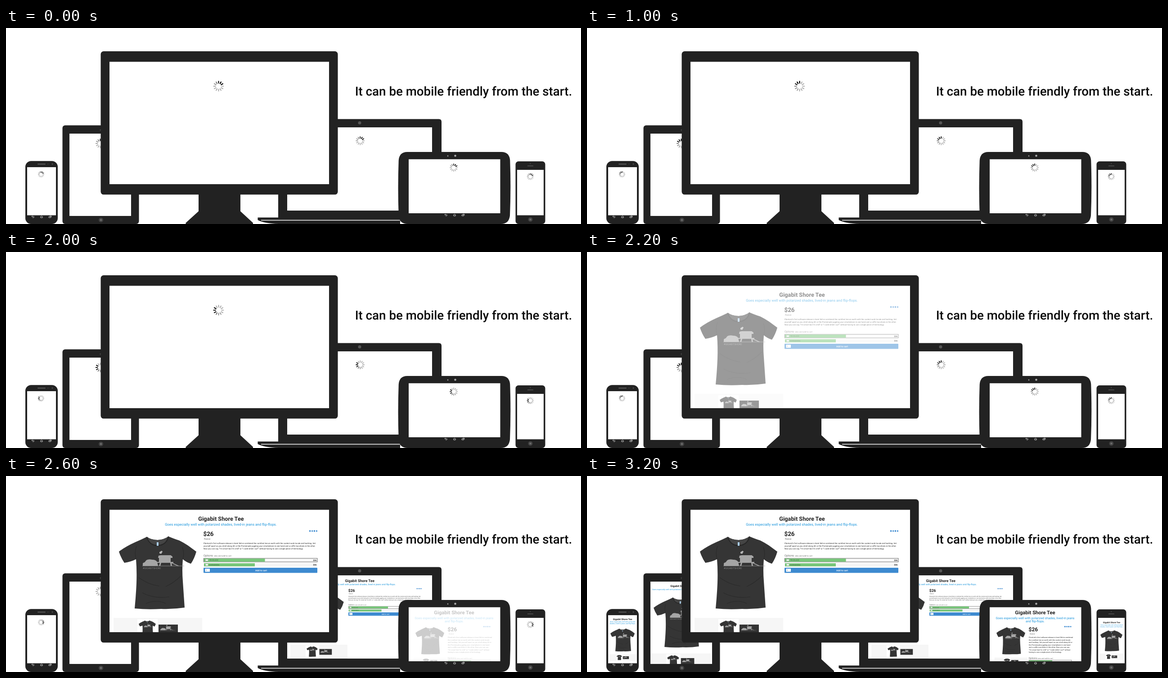
Write an HTML page that moves like this. It is 1278 px wide and 438 px high and loops after 8.7 s.

```html
<!DOCTYPE html>
<html lang="en">
<head>
<meta charset="utf-8">
<title>Responsive shop</title>
<style>
  /* --t counts ticks of 100 ms; everything else derives from it */
  @property --t { syntax: "<number>"; inherits: true; initial-value: 0; }
  @keyframes run { from { --t: 0; } to { --t: 87; } }
  html { animation: run 8.7s steps(87) infinite; }
  html, body { margin: 0; width: 100%; height: 100%; overflow: hidden; background: #fff; }
  svg { display: block; width: 1278px; height: 438px; }
  text { font-family: Roboto, "Open Sans", sans-serif; fill: #222; text-rendering: geometricPrecision; }
  .page { opacity: calc((var(--t) - var(--s)) / 4); }
  .wait { opacity: calc(var(--s) - var(--t) + 1); }
  .turn { transform-origin: 0 0; transform: rotate(calc(var(--t) * 30deg)); }
  .b { font-weight: 700; }
  .m { font-weight: 500; }
  .l { font-weight: 300; }
  .i { font-style: italic; }
  .mid { text-anchor: middle; }
  .end { text-anchor: end; }
  .blue { fill: #1b95dc; }
  .white { fill: #fff; }
</style>
</head>
<body>
<svg id="stage" viewBox="0 0 1278 438" xmlns="http://www.w3.org/2000/svg"></svg>
<script>
const DARK = '#222', GREEN = '#78c67a', BLUE = '#3d8ad0';
const TITLE = 'Gigabit Shore Tee';

const rect = (x, y, w, h, fill, more = '') =>
  `<rect x="${x}" y="${y}" width="${w}" height="${h}" fill="${fill}" ${more}/>`;
const dot = (x, y, r, fill) => `<circle cx="${x}" cy="${y}" r="${r}" fill="${fill}"/>`;
const path = (d, fill, more = '') => `<path d="${d}" fill="${fill}" ${more}/>`;
const text = (x, y, size, str, cls = '', more = '') =>
  `<text x="${x}" y="${y}" font-size="${size}" class="${cls}" ${more}>${str}</text>`;
const lines = (x, y, step, size, list, cls) =>
  list.map((s, i) => text(x, y + i * step, size, s, cls)).join('');
const use = (id, x, y, k) => `<use href="#${id}" transform="translate(${x} ${y}) scale(${k})"/>`;

function spinner(x, y, r) {
  const shades = ['#000', '#000', '#1c1c1c', '#808080', '#999', '#a4a4a4'];
  let spokes = '';
  for (let i = 0; i < 12; i++) {
    spokes += `<line y1="${-r * 0.58}" y2="${-r * 0.92}" stroke="${shades[i] || '#b2b2b2'}"
      transform="rotate(${60 - 30 * i})"/>`;
  }
  return `<g transform="translate(${x} ${y})"><g class="wait"><g class="turn"
    stroke-width="${r * 0.19}" stroke-linecap="round">${spokes}</g></g></g>`;
}

// A white screen with its loader and the page that fades in at tick `start`
function screen(id, [x, y, w, h], start, [sx, sy, sr], page) {
  return `<clipPath id="${id}">${rect(x, y, w, h, '#fff')}</clipPath>
    ${rect(x, y, w, h, '#fff')}
    <g clip-path="url(#${id})" style="--s:${start}">
      ${spinner(sx, sy, sr)}<g class="page">${page}</g>
    </g>`;
}

// Beach scene printed on the shirt
const print = `<g id="print">
  ${path('M53 66V61Q53 59 57 58L61 53Q66 50 74 52Q82 52 85 57L87 66Z', '#a5a5a5')}
  ${path('M88 43L93 42H115L119 45V48H115V57H121V59H117L118 66H115L114 59H94L92 66H89L91 59H83V57H89V48H87Z', '#a5a5a5')}
  ${path('M117 58L134 66H130L117 60Z', '#a5a5a5')}
  ${path('M90 35L95 32L97 34L94 39L90 38Z', '#b5b5b5')}
  ${rect(52, 65.6, 93, 0.8, '#999')}</g>`;

const tee = `<g id="tee">
  ${path(`M62 1Q72 8 86 8Q101 7 110 0Q124 6 134 9Q144 14 153 20L172 34Q168 49 160 61
    Q150 58 142 51Q140 75 142 100Q144 130 146 159Q120 163 94 162Q64 164 35 161
    Q38 130 39 104Q40 76 38 51Q26 57 12 59Q4 47 0 34Q14 23 36 13Q50 7 62 1Z`, '#353535')}
  ${path('M62 1Q72 8 86 8Q101 7 110 0Q107 17 86 19Q67 18 62 1Z', '#444')}
  ${path('M62 1Q67 20 86 21Q106 19 110 0', 'none', 'stroke="#262626" stroke-width="2"')}
  ${rect(84, 13, 4, 8, '#a9cbe6')}
  <g fill="none" stroke="#2a2a2a" stroke-width="1.2">
    <path d="M38 51Q34 35 39 22M142 51Q146 36 141 24M44 92Q66 108 90 111M52 126Q78 140 112 135M138 88Q122 104 104 112M60 150Q84 140 104 150"/>
  </g>
  <use href="#print"/>
  ${text(53, 73, 5.4, '#GIGABITSHORE', 'l', 'style="fill:#aaa"')}</g>`;

// Product photo with its strip of thumbnails
const photo = `<g id="photo"><use href="#tee"/>
  ${rect(-12, 182, 197, 50, '#f6f6f6')}
  ${rect(41, 185, 45, 45, '#fff')}
  ${use('tee', 44, 188, 0.22)}
  ${rect(88, 197, 43, 20, '#333')}
  ${use('print', 73, 186, 0.36)}</g>`;

const social = (x, y, k) => [0, 1, 2, 3].map(i =>
  i % 2 ? dot(x + (i * 4.9 + 1.7) * k, y + 1.9 * k, 1.7 * k, BLUE)
        : rect(x + i * 4.9 * k, y + 0.3 * k, 3.2 * k, 3.2 * k, BLUE)).join('');

const option = (y, h, end, label) =>
  rect(440, y, end - 440, h, GREEN) + rect(443.5, y + 1.7, 5.5, 3.6, '#fff', 'stroke="#999" stroke-width=".4"') +
  text(451.5, y + 4.8, 3.3, label, '', 'letter-spacing=".5"') +
  text(690, y + 5, 4.4, '$26', 'b end');

const widePage = `<g id="wide">
  ${text(478, 100, 12.7, TITLE, 'b mid')}
  ${text(477.5, 111.4, 7.93, 'Goes especially well with polarized shades, lived-in jeans and flip-flops.', 'blue mid')}
  ${use('photo', 251, 135, 1)}
  ${text(438.5, 134, 13.4, '$26', 'b')}
  ${text(440, 142, 3.7, 'PlonkJot', 'i')}
  ${social(674, 121, 1)}
  ${lines(439, 151.6, 6.2, 4.38, [
    'PlonkJot’s first software release is here! We’ve combined the comfiest tee on earth with the coolest work locale and hashtag. Set',
    'yourself apart as you stroll along AK or the Promenade juggling your smartphone in one hand and a caffè macchiato in the other.',
    'Now you can say, “I’m smart but I’m chill” or “I code while I surf” without having to use a single piece of technology.'])}
  ${text(439, 180, 6.2, 'Options', 'l')}${text(462, 180, 4.4, 'view and add to cart', 'l')}
  ${rect(439.5, 184, 252.5, 8, '#f8f8f8', 'stroke="#555" stroke-width=".9"')}
  ${option(184.5, 7, 575.5, 'TRI-BLACK')}
  ${rect(439.5, 194.7, 252.5, 7.6, '#f5f5f5')}
  ${option(195, 7, 553, 'EVERGREEN')}
  ${rect(439, 205, 253, 11.5, BLUE, 'rx="1"')}
  ${rect(442.5, 207, 10.5, 7, '#fff', 'rx=".6"')}${text(444.5, 212, 4, '1')}
  ${text(567, 212.6, 5.3, 'Add to cart', 'm mid white')}</g>`;

const tabletPage =
  text(209.5, 248, 6.05, TITLE, 'b mid') +
  text(210, 255, 4.15, 'Goes especially well with polarized shades, lived-in jeans and flip-flops.', 'blue mid') +
  use('photo', 148, 271, 0.69);

const slatePage =
  text(996, 309, 11.2, TITLE, 'b mid') +
  lines(996, 319.5, 7.5, 6.97, ['Goes especially well with polarized shades, lived-in jeans', 'and flip-flops.'], 'blue mid') +
  use('photo', 910, 338, 0.372) +
  text(981.5, 346.5, 12, '$26', 'b') + text(984, 353.5, 3, 'PlonkJot', 'i') +
  social(1061, 335, 0.86) +
  lines(982, 362, 5.5, 3.9, [
    'PlonkJot’s first software release is here! We’ve combined',
    'the comfiest tee on earth with the coolest work locale',
    'and hashtag. Set yourself apart as you stroll along AK or',
    'the Promenade juggling your smartphone in one hand',
    'and a caffè macchiato in the other. Now you can say,',
    '“I’m smart but I’m chill” or “I code while I surf” without',
    'having to use a single piece of technology.']) +
  text(981.5, 409.3, 5.6, 'Options', 'l') + text(1001.5, 409.3, 3.9, 'view and add to cart', 'l') +
  rect(982, 411.6, 95, 6, '#f8f8f8', 'stroke="#555" stroke-width=".6"') + rect(982.4, 412, 51.6, 6, GREEN);

const phonePage = (cx, y, size, sub, step, tx, ty, k) =>
  text(cx, y, size, TITLE, 'b mid') +
  lines(cx, y + step * 1.15, step, sub,
    ['Goes especially well with polarized', 'shades, lived-in jeans and flip-flops.'], 'blue mid') +
  use('photo', tx, ty, k);

// Back, home and recent-apps keys
const keys = (x, y, gap) => `<g fill="none" stroke="#ddd" stroke-width=".9">
  <path d="M${x - gap - 2.5} ${y - 1}h4q2 1.5 0 2.8h-2.5M${x - gap - 1.5} ${y - 2.3}l-1.5 1.3 1.5 1.3"/>
  <path d="M${x - 2.8} ${y}l2.8 -2 2.8 2M${x - 2} ${y}v2h4v-2"/>
  <path d="M${x + gap - 2.8} ${y - 0.6}h4.2v2.5h-4.2zM${x + gap - 1} ${y - 2}h3.8v2.6"/></g>`;

const home = (x, y) => dot(x, y, 5, '#424242') +
  rect(x - 2, y - 2, 4, 4, '#6c6c6c', 'rx=".8"');

const tablet = rect(125.5, 217.5, 170, 220.5, DARK, 'rx="6"') + dot(211, 228, 2.5, '#444') + home(211, 429) +
  screen('c1', [141, 236, 137, 184], 26, [209.5, 258, 10.5], tabletPage);

const laptop = path('M605 424V203.5H962Q968 203.5 968 209.5V424Z', DARK) + dot(786, 212, 3.5, '#555') +
  path('M559.5 423.5H876V438H606Q574 437 559.5 429Z', DARK) + rect(567, 428.8, 309, 1.5, '#fff') +
  screen('c2', [625, 222, 322, 186], 22, [787.2, 252, 9.8],
    '<use href="#wide" transform="translate(477.85 172.5) scale(.645)"/>');

const monitor = rect(210.5, 52, 527, 320.3, DARK, 'rx="6.5"') +
  path('M428 371H521V409.5L549 435.5V438H399.5V435.5L428 409.5Z', DARK) +
  screen('c3', [230, 75.5, 488, 273.5], 20, [472.5, 130, 11.8], widePage);

const slate = path(`M892 277H1101Q1119 277 1120.3 296Q1122.5 358 1120 419Q1118 438 1100 438
    H893Q874 438 872.7 419Q870.5 358 872.7 296Q874 277 892 277Z`, DARK) +
  dot(982, 286, 1.4, '#999') + dot(998.5, 285.5, 2.3, '#aaa') + keys(997, 418, 19) +
  screen('c4', [895, 293.3, 203.5, 120.7], 25, [995.2, 312, 9], slatePage);

const phone = rect(43, 297.3, 72, 140.7, DARK, 'rx="13"') +
  rect(70, 303, 18, 2.2, '#555', 'rx="1"') + dot(92, 304, 0.9, '#444') + dot(95, 304, 0.9, '#444') +
  dot(103, 304, 1.7, '#4a4a4a') + keys(79, 422, 19) +
  screen('c5', [47, 311, 64, 107.5], 28, [78, 327, 7], phonePage(79, 322, 5.35, 3.68, 4.3, 52, 341, 0.314));

const slim = rect(1132.5, 298, 66, 140, DARK, 'rx="6.5"') + dot(1165.3, 303, 0.9, '#555') +
  rect(1158.8, 307.4, 13.4, 1.7, '#555', 'rx=".8"') + home(1165.5, 428) +
  screen('c6', [1136, 317, 59, 101.5], 26, [1165.3, 332, 7.6], phonePage(1166, 329, 4.75, 3.2, 4, 1141, 345, 0.285));

document.getElementById('stage').innerHTML =
  `<defs>${print}${tee}${photo}</defs>` + tablet + laptop + monitor + slate + phone + slim +
  text(775.7, 150.5, 27.7, 'It can be mobile friendly from the start.', 'm', 'style="fill:#0b0b0b"');
</script>
</body>
</html>
```
